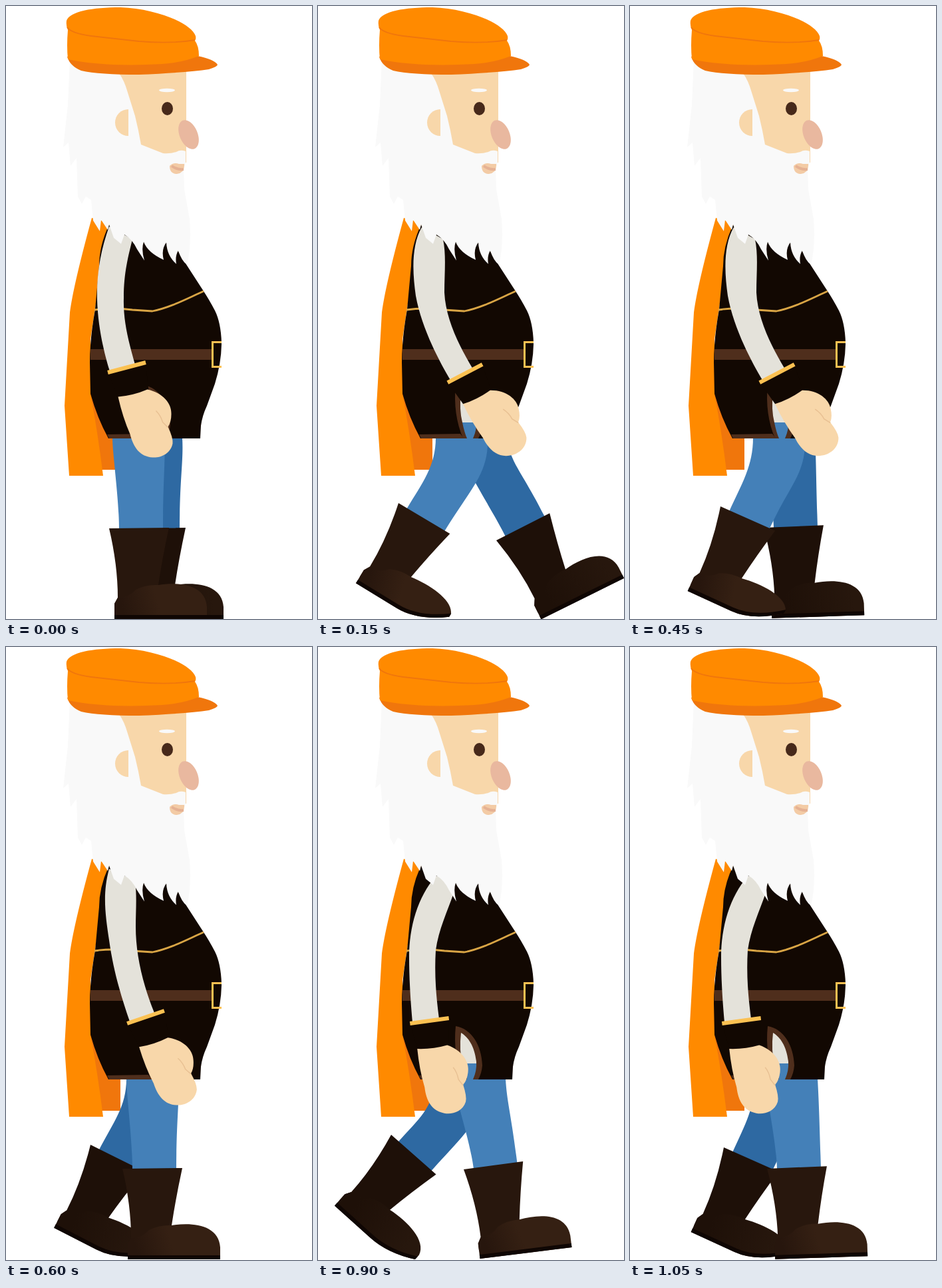
An HTML page that plays this animation: 460 px wide and 920 px high, repeating every 1200 ms.

```html
<!DOCTYPE html>
<html lang="en">
<head>
<meta charset="utf-8">
<title>Walking man</title>
<style>
html, body { margin: 0; width: 100%; height: 100%; overflow: hidden; background: #fff; }
svg { display: block; width: 460px; height: 920px; }
</style>
</head>
<body>
<svg viewBox="0 0 460 920">
  <defs>
    <linearGradient id="nearFoot" gradientUnits="userSpaceOnUse" x1="18" y1="112" x2="70" y2="98">
      <stop offset="0" stop-color="#27160d"/><stop offset="1" stop-color="#352013"/>
    </linearGradient>
    <linearGradient id="farFoot" gradientUnits="userSpaceOnUse" x1="30" y1="112" x2="130" y2="98">
      <stop offset="0" stop-color="#1e1008"/><stop offset="1" stop-color="#27170d"/>
    </linearGradient>
  </defs>

  <g id="cape">
    <path fill="#f0760c" d="M122 560L172 630V696H143Z"/>
    <path fill="#ff8a00" d="M129 318L158 326L142 400L127 500L127 582Q138 640 146 705H95L88 600L96 460Q101 420 129 318Z"/>
  </g>
  <path fill="#e4e2da" d="M205 565H248V630H205Z"/>

  <g id="far"></g>
  <g id="near"></g>

  <g id="torso">
    <path fill="#120802" fill-rule="evenodd" d="M155 328Q140 360 140 390L134 455Q126 500 126 535L127 582Q137 618 154 649H220Q210 615 208 570Q250 595 240 649H292L293 630Q295 615 302 600L314 567Q324 535 324 505Q323 475 314 457Q305 440 297 428L262 374L240 330Z"/>
    <path fill="#4f2e1c" d="M127 515H310V531H127ZM152 643L214 642L219 649H155Z"/>
    <path fill="#4f2e1c" d="M207 569C231 573 246 598 247 628Q246 640 241 649H233Q239 636 238 622C235 598 226 586 215 579Q212 605 217 625Q220 640 224 649H218C208 625 204 598 207 569Z"/>
    <path fill="none" stroke="#d9a545" stroke-width="2.8" d="M133 456Q160 452 190 456L220 458C246 453 270 440 297 428"/>
    <path fill="none" stroke="#fbc152" stroke-width="3" d="M324 504.500H310.500V541.500H324"/>
  </g>

  <path id="sleeve" fill="#e4e2da"/>
  <g id="hand">
    <path fill="#120802" d="M-28 8L-12 46L15 42L33 34L28 -7Z"/>
    <path fill="#f8d7aa" d="M-13 44Q10 42 31 33C55 38 68 55 67 70Q67 82 62 89Q70 106 69 114C66 130 50 136 39 135C20 134 10 120 5 100Q-6 75 -13 44Z"/>
    <path fill="none" stroke="#e8c093" stroke-width="1.500" d="M44 65Q51 72 54 82L62 90"/>
    <path stroke="#fbc152" stroke-width="6" d="M-28.500 7.500L28.500 -7.500"/>
  </g>

  <g id="head">
    <path fill="#f8d7aa" d="M160 90H271V235H185Z"/>
    <path fill="#f9f9f9" d="M96 80L93 148L86 212L94 205L97 240L106 228L108 286L114 297L120 286L128 291L131 322L141 338L143 321L153 336L155 328L162 348L173 357L178 343Q190 350 197 365L208 382Q203 365 207 354Q213 370 237 381Q233 365 241 355Q242 375 256 387Q254 375 259 367Q264 383 272 388Q279 360 276 320L268 275L267 245L270 236V218Q262 215 256 219Q246 222 236 221L203 208Q199 185 194 165L183 130Q178 112 170 101Z"/>
    <path fill="#f8d7aa" d="M184 155A20 20 0 0 0 184 195Z"/>
    <path fill="#f3cba5" d="M246 240Q252 234 260 237L268 237Q269 250 257 252Q246 252 246 240Z"/>
    <path fill="none" stroke="#e5b193" stroke-width="4" d="M249 240Q257 246 267 245"/>
    <ellipse cx="242" cy="126.500" rx="12" ry="2.700" fill="#f9f9f9"/>
    <ellipse cx="242.500" cy="154" rx="8.500" ry="10" fill="#47291a"/>
    <ellipse cx="274.500" cy="193" rx="13.500" ry="23" fill="#e9b89f" transform="rotate(-23 274.500 193)"/>
    <path fill="#f0760c" d="M92 76Q96 90 113 97Q140 103 200 103Q270 100 305 95Q318 91 318 88Q313 80 288 75L200 76Z"/>
    <path fill="#ff8a00" d="M91 22C96 8 130 2 172 2C225 4 278 25 285 45Q286 50 284 52Q290 60 290 75Q265 85 235 87Q150 92 93 80Q91 60 93 36Q90 30 91 22Z"/>
    <path fill="none" stroke="#f0760c" stroke-width="1.800" d="M92 32Q98 41 128 45L200 53Q250 57 284 51"/>
  </g>
</svg>

<script>
const STEP = 150;
const $ = id => document.getElementById(id);

// Leg: boot corner x, y, boot angle, toe bend, left side of hip
const near = [
  [155, 784, 0, 0, 160], [121, 746, 31.4, 1, 177], [99, 722, 49, 0.5, 165], [136, 751, 24.6, 1, 185],
  [175, 783, 0, 0, 181], [232, 787, -13.6, 0, 202], [219, 784, -7, 0, 204], [206, 783, -1.8, 0, 204]
];
const far = [
  [180, 784, 0, 0, 187], [268, 802, -26.3, 0, 207], [206, 776, 0, 0, 200], [201, 783, -1.8, 0, 200],
  [127, 747, 27.1, 1, 181], [115, 747, 27.1, 1, 175], [110, 732, 42, 0.7, 175], [141, 751, 24.6, 1, 188]
];

// Arm: cuff x, y, angle and sleeve outline
const arms = [
  [181.5, 542.5, 0, "M155 331C143 365 136 400 137 440C138 485 150 530 156 548L194 538C183 500 176 470 177 438C177 400 184 375 190 350Z"],
  [221, 551.5, -12.7, "M156 332C140 360 142 400 147 435C155 480 180 530 200 563L233 545C212 510 192 470 190 430C190 400 193 375 188 350Z"],
  [230.5, 543, -21.3, "M156 332C136 380 138 420 150 455C165 500 192 535 209 559L241 536C215 510 192 475 186 430C184 400 188 375 186 348Z"],
  [210, 555.5, -4, "M155 333C145 370 149 400 155 440C162 490 175 530 186 562L223 549C205 505 195 460 195 420C195 395 197 375 194 350Z"],
  [167.5, 561, 7, "M177 344C150 375 137 420 137 465C137 505 140 540 142 563L182 558C177 520 175 490 177 455C181 425 195 395 203 372L190 340Z"]
];
const armOrder = [0, 1, 2, 1, 3, 4, 4, 4];

const looks = {
  near: { cloth: "#4480b8", shaft: "#28170d", foot: "url(#nearFoot)" },
  far: { cloth: "#2e69a2", shaft: "#1e1008", foot: "url(#farFoot)" }
};

function leg([x, y, angle, bend, hip], look) {
  const a = angle * Math.PI / 180, c = Math.cos(a), s = Math.sin(a);
  const at = (u, v) => `${(x + u * c - v * s).toFixed(1)} ${(y + u * s + v * c).toFixed(1)}`;
  const drop = angle > 0 ? 690 : 672;
  const thigh = `M${hip} 625V648C${hip} ${drop} ${at(15, -45)} ${at(15, 2)}L${at(81, 2)}` +
    `C${at(81, -75)} ${hip + 80} ${drop + 12} ${hip + 78} 648V625Z`;

  const toe = `${147 + 7 * bend} ${136 - 30 * bend}`;
  const sole = `${toe}Q115 136 80 136H8`;
  const top = `C105 80 ${145 + bend} ${84 - 2 * bend} ${147 + 7 * bend} ${118 - 17 * bend}`;
  return `<path fill="${look.cloth}" d="${thigh}"/>
    <g transform="translate(${x} ${y}) rotate(${angle})">
      <path fill="${look.shaft}" d="M0 0L90 -1Q80 45 74 85L70 125H8V113L13 104Q13 55 0 0Z"/>
      <path fill="${look.foot}" d="M13 104Q30 104 40 92Q55 84 74 85${top}L${sole}V113Z"/>
      <path fill="#0f0603" d="M${sole}V130H80Q115 130 ${147 + 7 * bend} ${130 - 30 * bend}Z"/>
    </g>`;
}

function draw(pose) {
  $("near").innerHTML = leg(near[pose], looks.near);
  $("far").innerHTML = leg(far[pose], looks.far);
  const [x, y, angle, outline] = arms[armOrder[pose]];
  $("sleeve").setAttribute("d", outline);
  $("hand").setAttribute("transform", `translate(${x} ${y}) rotate(${angle})`);
}

const start = performance.now();
let shown = -1;
function tick() {
  const pose = Math.floor((performance.now() - start) / STEP) % near.length;
  if (pose !== shown) draw(shown = pose);
  requestAnimationFrame(tick);
}
tick();
</script>
</body>
</html>
```
